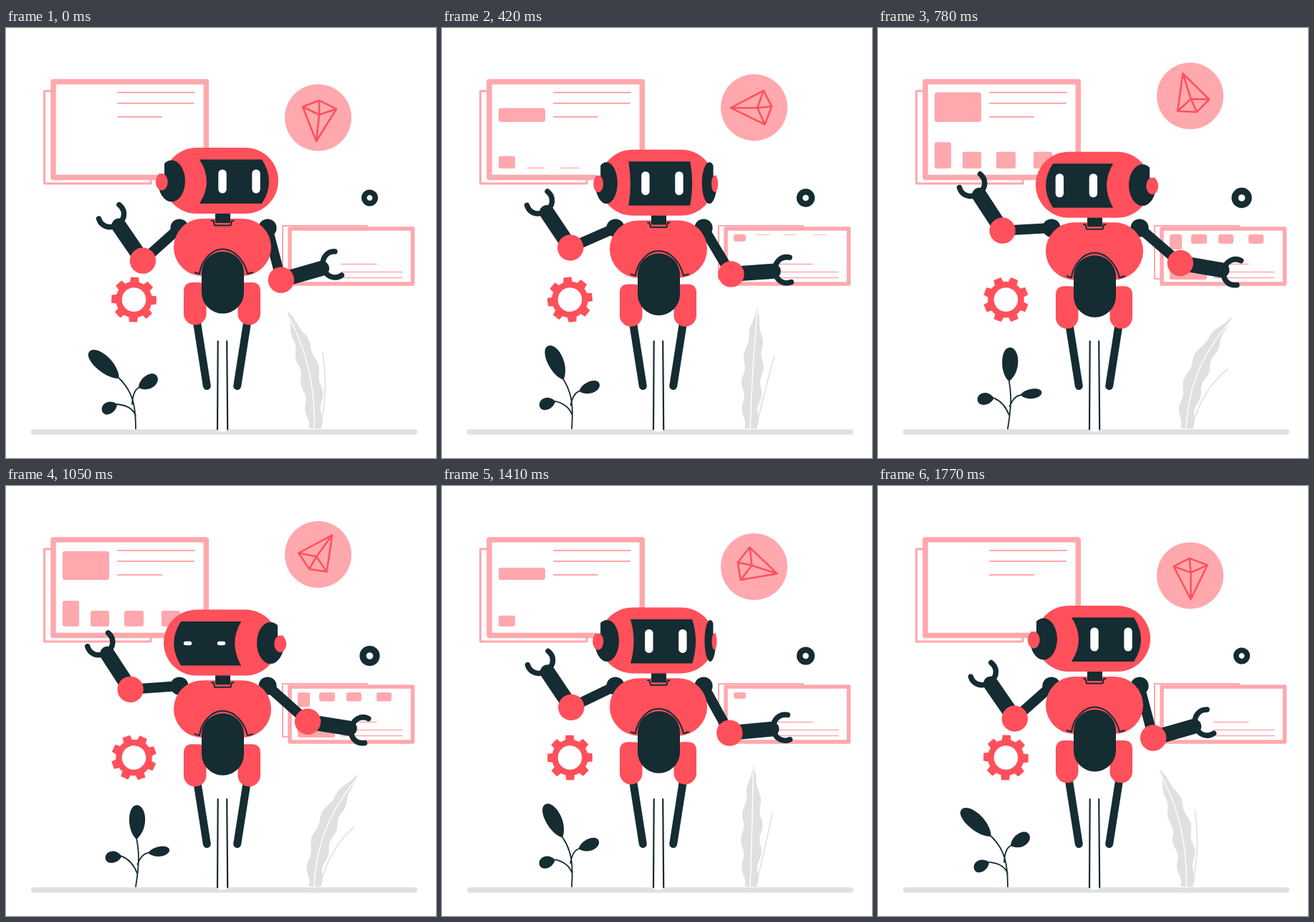
These frames come from a looping animation (600x600 px, 1.8 s). An HTML page:

```html
<!DOCTYPE html>
<html lang="en">
<head>
<meta charset="utf-8">
<title>Robot assistant</title>
<style>
html, body { margin: 0; width: 100%; height: 100%; overflow: hidden; background: #fff; }
svg { display: block; width: 100vw; height: 100vh; }
</style>
</head>
<body>
<svg id="stage" viewBox="0 0 600 600"></svg>
<script>
const LOOP = 1800, STEP = 30;
const RED = '#ff505b', PINK = '#ffa8ad', DARK = '#142c32', GRAY = '#e0e0e0';
const stage = document.getElementById('stage');

const mix = (a, b, k) => a + (b - a) * k;
const polar = (x, y, len, deg) => {
  const a = deg * Math.PI / 180;
  return [x + len * Math.cos(a), y + len * Math.sin(a)];
};

const group = (transform, body) => `<g transform="${transform}">${body}</g>`;
const path = (d, fill) => `<path d="${d}" fill="${fill}"/>`;
const stroke = (d, color, width, cap = 'round') =>
  `<path d="${d}" fill="none" stroke="${color}" stroke-width="${width}" stroke-linecap="${cap}" stroke-linejoin="round"/>`;
const circle = (x, y, r, fill) => `<circle cx="${x}" cy="${y}" r="${r}" fill="${fill}"/>`;
const ellipse = (x, y, rx, ry, fill) => `<ellipse cx="${x}" cy="${y}" rx="${rx}" ry="${ry}" fill="${fill}"/>`;
const box = (x1, y1, x2, y2, r, fill) =>
  `<rect x="${x1}" y="${y1}" width="${x2 - x1}" height="${y2 - y1}" rx="${r}" fill="${fill}"/>`;
const frame = (x1, y1, x2, y2, width) =>
  `<rect x="${x1}" y="${y1}" width="${x2 - x1}" height="${y2 - y1}" fill="#fff" stroke="${PINK}" stroke-width="${width}" stroke-linejoin="round"/>`;

// A bar that grows away from its anchored edge; dir is -1 for up, 1 for down.
function bar(x1, x2, y, full, dir, k) {
  if (k <= 0) return '';
  const h = full * k;
  const top = dir < 0 ? y - h : y;
  return `<rect x="${x1}" y="${top}" width="${x2 - x1}" height="${h}" rx="3" ry="${Math.min(3, h / 2)}" fill="${PINK}"/>`;
}

function cards(p) {
  const late = (p - .42) / .58;
  return frame(53.5, 88, 202, 217, 3) + frame(66, 75, 279.3, 208.5, 7.5)
    + stroke('M156 90H263M156 105H262M156 124H217', PINK, 2)
    + bar(79, 144, 131, 43, -1, p)
    + bar(79, 102, 196, 38.5, -1, p)
    + [[118, 144], [165, 192], [217, 243]].map(([a, b]) => bar(a, b, 196, 25, -1, late)).join('')
    + frame(386, 276, 504, 350, 2) + frame(396, 280, 567.5, 357, 5.5)
    + stroke('M468 329.5H517M468 340.5H553M468 348.5H553', PINK, 1.3)
    + bar(407, 424, 288, 22, 1, p)
    + [[437, 459], [475, 496], [517, 538]].map(([a, b]) => bar(a, b, 288, 14, 1, late)).join('')
    + bar(407, 459, 351, 14, -1, late);
}

function badge(p, turn) {
  const gem = 'M1-24L-22-15L-3 33L25-12ZM-22-15L1-4L25-12M1-24V-4L-3 33';
  return group(`translate(435.5 ${125 - 31.5 * p})`,
    circle(0, 0, 46.5, PINK) + group(`translate(.5 0) rotate(${turn})`, stroke(gem, RED, 2.5)));
}

function gear(turn) {
  let teeth = '';
  for (let i = 0; i < 8; i++) teeth += group(`rotate(${i * 45})`, path('M-6.5-23L-5.5-31.3H5.5L6.5-23Z', RED));
  return group(`translate(178.5 379) rotate(${turn})`,
    teeth + `<circle r="21" fill="none" stroke="${RED}" stroke-width="8.5"/>`);
}

function ring(p) {
  return group(`translate(507.5 237) scale(${1 + .24 * p})`,
    `<circle r="7.7" fill="none" stroke="${DARK}" stroke-width="7.6"/>`);
}

function leaf(x, y, deg, sx, sy) {
  return group(`translate(${x} ${y}) rotate(${deg}) scale(${sx} ${sy})`,
    path('M0 0C-15-13-16-56-2-56C11-56 17-19 0 0Z', DARK));
}

function sprig(p) {
  const m = (a, b) => mix(a, b, p);
  const main = `M181 559C${m(181, 186)} 530 ${m(178, 187)} ${m(508, 512)} ${m(158, 184)} ${m(489, 493)}`;
  const right = `M${m(176, 184)} ${m(525, 528)}Q${m(177, 190)} ${m(506, 514)} ${m(185, 199)} ${m(502, 512.7)}`;
  const left = `M${m(181, 183)} ${m(541, 540)}Q176 ${m(527, 522)} ${m(155, 162)} ${m(525, 516)}`;
  return stroke(main + right + left, DARK, 1.8)
    + leaf(m(158, 184), m(489, 493.3), m(-45.7, 6.8), 1, m(1, .84))
    + leaf(m(185, 199), m(502, 512.7), m(62, 86), m(.84, .6), .54)
    + leaf(m(155, 162), m(525, 516), m(-112, -91), .74, .41);
}

function feather(p) {
  const tipX = 392 + 107 * p;
  const tipY = 559 - Math.sqrt(169 ** 2 - (tipX - 430) ** 2);
  const bend = [433, 472], left = [], right = [];
  for (let i = 0; i <= 40; i++) {
    const u = i / 40, v = 1 - u;
    const x = v * v * 430 + 2 * u * v * bend[0] + u * u * tipX;
    const y = v * v * 559 + 2 * u * v * bend[1] + u * u * tipY;
    const dx = v * (bend[0] - 430) + u * (tipX - bend[0]);
    const dy = v * (bend[1] - 559) + u * (tipY - bend[1]);
    const n = Math.hypot(dx, dy);
    const edge = phase => (8.5 + 5 * Math.sin(Math.PI * u) + 2 * Math.sin(28 * u + phase)) * (1 - u ** 5);
    const a = edge(3.6), b = edge(.1);
    left.push(`${x + dy / n * a} ${y - dx / n * a}`);
    right.unshift(`${x - dy / n * b} ${y + dx / n * b}`);
  }
  return path(`M${left.join('L')}L${right.join('L')}Z`, GRAY)
    + stroke(`M430 559Q${bend} ${tipX} ${tipY + 4}`, '#fff', 1.4)
    + stroke(`M438 558Q450.5 506 ${442 + 48 * p} ${453 + 25 * p * p}`, GRAY, 1.6);
}

function arm(shoulder, length, upperDeg, foreDeg) {
  const [x, y] = polar(...shoulder, length, upperDeg);
  return circle(...shoulder, 12.6, DARK)
    + stroke(`M${shoulder}L${x} ${y}`, DARK, 14)
    + group(`translate(${x} ${y}) rotate(${foreDeg})`,
      stroke('M0 0H59', DARK, 21)
      + stroke('M83-17.5C72-21 63-13 62-4M83 17C72 20.5 63 13 62 4', DARK, 7.5)
      + circle(0, 0, 18.2, RED));
}

// The ear narrows toward the rim of the head as it turns out of sight.
function ear(x, side, size) {
  if (size < .03) return '';
  const button = size > .3 ? ellipse(-4.7, .7, 8.5, 11.7, RED) : '';
  return group(`translate(${x} 214) scale(${side * size} 1)`,
    ellipse(9, -.5, 19, 29, DARK) + box(-8.5, -30, -1, -10, 0, '#fff') + button);
}

function blink(t) {
  const gap = Math.min(Math.abs(t - 240), Math.abs(t - 1065));
  return Math.max(.045, Math.min(1, gap / 90));
}

function head(t, q) {
  const m = (a, b) => mix(a, b, q);
  const lc = m(270, 244), lm = m(280, 234), rc = m(357, 328), rm = m(367, 319);
  const visor = `M${lc} 183.5H${rc}Q${2 * rm - rc} 214 ${rc} 245H${lc}Q${2 * lm - lc} 214 ${lc} 183.5Z`;
  const eyeX = m(302, 253.3), h = 33 * blink(t);
  const eye = x => box(x - 5.7, 214 - h / 2, x + 5.7, 214 + h / 2, Math.min(5.5, h / 2), '#fff');
  return box(220, 167, 380, 259, 46, RED)
    + path(visor, DARK) + eye(eyeX) + eye(eyeX + 47)
    + ear(222, 1, 1 - q ** 1.7) + ear(378, -1, 1 - (1 - q) ** 1.7);
}

function pod(x) {
  return path(`M${x} 367Q${x} 355 ${x + 12} 355H${x + 19.5}Q${x + 31.5} 355 ${x + 31.5} 367V398.5A15.75 15.75 0 0 1 ${x} 398.5Z`, RED);
}

function body() {
  return box(234, 266, 370, 346, 40, RED)
    + box(292, 255, 313, 272, 0, DARK)
    + stroke('M287 269H289.5L291 275.5H313.5L315 269H317.5', DARK, 2)
    + stroke('M263.5 341L270 343C272 326 286 308.5 302 308.5C320 308.5 333 326 337 343L344 341', DARK, 2)
    + pod(248) + pod(323.5)
    + box(273, 312, 332, 398.5, 29.5, DARK);
}

function scene(t) {
  const phase = t / LOOP, turn = 360 * phase;
  const p = (1 - Math.cos(2 * Math.PI * phase)) / 2;
  const x = 1 - Math.abs(1 - 2 * phase);
  const ease = k => (2 * k) ** 4.3 / 2;
  const q = x < .5 ? ease(x) : 1 - ease(1 - x);
  return cards(p) + badge(p, turn) + gear(2 - 120 * p) + ring(p)
    + feather(p) + stroke('M38.7 563.7H570.3', GRAY, 7.5) + sprig(p)
    + path('M295 436H308.5L309.5 561Q302 566 294.5 561Z', '#fff')
    + stroke('M295.7 437L295 560M308.2 437L309.2 560', DARK, 2.2)
    + stroke('M266 408L280.3 499.5M337 408L322.7 499.5', DARK, 11)
    + arm([242, 279], 68.5, 138.2 + 40.5 * p, -124.5 + 1.5 * p)
    + arm([365, 279], 75, 75.4 - 36.2 * p, -16 + 26.8 * p)
    + group(`translate(0 ${5.5 * p})`, body())
    + group(`translate(0 ${6 * p})`, head(t, q));
}

let shown = -1;
function tick(now) {
  const t = Math.floor(now % LOOP / STEP) * STEP;
  if (t !== shown) stage.innerHTML = scene(shown = t);
  requestAnimationFrame(tick);
}
stage.innerHTML = scene(0);
requestAnimationFrame(tick);
</script>
</body>
</html>
```
